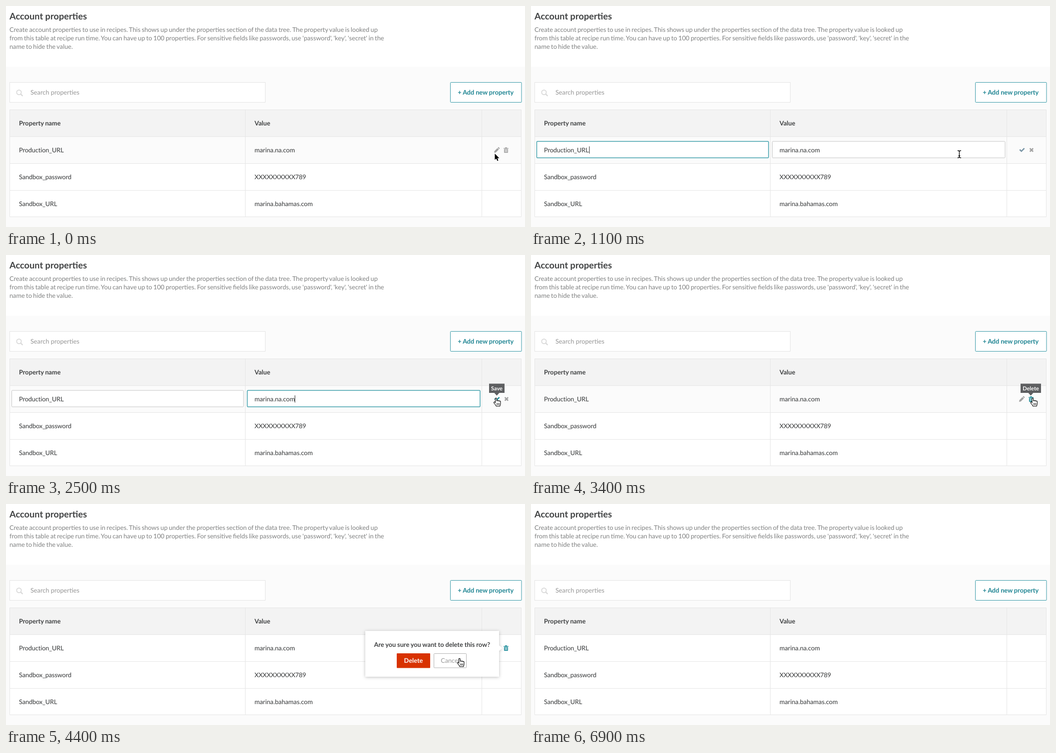
These frames come from a looping animation (1040x444 px, 7 s). An HTML page:

```html
<!DOCTYPE html>
<html lang="en">
<head>
<meta charset="utf-8">
<title>Account properties</title>
<style>
  html, body { margin: 0; width: 100%; height: 100%; overflow: hidden; background: #fff; }
  svg { display: block; }
  text { font: 12.74px Lato, sans-serif; fill: #343637; white-space: pre; text-rendering: geometricPrecision; }
  .bold { font-weight: 700; fill: #404243; word-spacing: -.02em; }
  .mid { text-anchor: middle; }
  .title { font-size: 18.2px; font-weight: 700; fill: #404243; }
  .note { fill: #7f8080; word-spacing: -.062em; }
  .tight { letter-spacing: -.11px; }
  .tip { font-size: 11px; font-weight: 700; fill: #fff; }
  .grid { fill: none; stroke: #e6e6e6; }
</style>
</head>
<body>
<svg width="1040" height="444" viewBox="0 0 1040 444">
  <defs>
    <filter id="shadow" x="-10%" y="-20%" width="120%" height="145%">
      <feDropShadow dx="0" dy="1" stdDeviation="3" flood-opacity=".25"/>
    </filter>
  </defs>
  <rect y="122" width="1040" height="322" fill="#fbfbfb"/>
  <text class="title" x="7" y="27">Account properties</text>
  <text class="note" x="7" y="51.7">Create account properties to use in recipes. This shows up under the properties section of the data tree. The property value is looked up</text>
  <text class="note" x="7" y="68.9">from this table at recipe run time. You can have up to 100 properties. For sensitive fields like passwords, use 'password', 'key', 'secret' in the</text>
  <text class="note" x="7" y="86">name to hide the value.</text>

  <rect x="7.5" y="153.5" width="512" height="40" fill="#fff" stroke="#e4e4e4"/>
  <g fill="none" stroke="#d9d9d9" stroke-width="1.8">
    <circle cx="26" cy="173.5" r="4.6"/>
    <path d="M29.4 176.9l4 4" stroke-width="2.2"/>
  </g>
  <text x="49" y="177.7" style="fill:#959595">Search properties</text>
  <rect x="890.5" y="153.5" width="142.5" height="40" rx="1" fill="#fff" stroke="#3a9ba8"/>
  <text class="bold mid" x="961.3" y="177.7" style="fill:#1f8593">+ Add new property</text>

  <rect x="7.5" y="208.5" width="1025" height="54" fill="#f3f3f3"/>
  <rect x="7.5" y="262.5" width="1025" height="161" fill="#fff"/>
  <rect id="hover" x="7.5" width="1025" height="54" fill="#fbfbfb"/>
  <path class="grid" d="M7.5 208.5H1032.5V423.5H7.5zM7.5 262.5H1032.5M7.5 316.5H1032.5M7.5 370.5H1032.5M479.5 208.5V423.5M953.5 208.5V423.5"/>
  <text class="bold" x="26" y="239.7">Property name</text>
  <text class="bold" x="498" y="239.7">Value</text>
  <text class="tight" x="26" y="293.7">Production_URL</text>
  <text x="498" y="293.7">marina.na.com</text>
  <text class="tight" x="26" y="347.6">Sandbox_password</text>
  <text class="tight" x="498" y="347.6">XXXXXXXXXX789</text>
  <text class="tight" x="26" y="401.6">Sandbox_URL</text>
  <text x="498" y="401.6">marina.bahamas.com</text>
  <g id="live"></g>
</svg>
<script>
const LOOP = 7000, STEP = 100, TEAL = '#1f8d9b', GREY = '#a3a3a3';
const EDIT = 700, FOCUS_VALUE = 1500, SAVE = 2700, ASK = 3700, CANCEL = 4700;

// Pointer path: time, x, y
const path = [
  [0, 979.5, 296.5], [200, 983, 289], [700, 983, 289], [1100, 858.3, 297.5],
  [1400, 700, 291], [1800, 700, 291], [2400, 982, 288], [2900, 982, 288],
  [3300, 1005.5, 288], [3800, 1005.5, 288], [4300, 909, 311], [4800, 909, 311],
  [5400, 936, 307], [5800, 944, 330], [6300, 930, 450], [LOOP, 930, 460]
];

const icons = {
  pencil: 'M978 295l.7-3.6 6-6 2.9 2.9-6 6zM985.4 284.7l.9-.9q.6-.5 1.2 0l1.6 1.6q.5.6 0 1.2l-.9.9z',
  trash: 'M997 285.6h2.8l.6-1.6h3.2l.6 1.6h2.8v1.2h-10zM998 287.4h8v6.4q0 1.2-1.2 1.2h-5.6q-1.2 0-1.2-1.2zM999.7 288.6v4.8h.9v-4.8zM1001.6 288.6v4.8h.9v-4.8zM1003.5 288.6v4.8h.9v-4.8z',
  check: 'M978.4 289.4l1.9-1.8 2.4 2.3 5-5 1.8 1.8-6.8 6.9z',
  cross: 'M998.7 287l1.9-1.9 2.3 2.3 2.3-2.3 1.9 1.9-2.3 2.3 2.3 2.3-1.9 1.9-2.3-2.3-2.3 2.3-1.9-1.9 2.3-2.3z'
};
const icon = (name, color, row = 0) =>
  `<path d="${icons[name]}" fill="${color}" fill-rule="evenodd" transform="translate(0 ${row * 54})"/>`;

const cursors = {
  arrow: '<path d="M0 0V12.6L2.9 9.9 5 14.7 7.1 13.8 5.1 9.2H9z" stroke="#fff" paint-order="stroke" stroke-width="2"/>',
  hand: '<path d="M-1.5 8.6V.8a1.4 1.4 0 0 1 2.8 0V5.4a1.3 1.3 0 0 1 2.6.3a1.3 1.3 0 0 1 2.6.5a1.2 1.2 0 0 1 2.4.7V11Q8.7 13 7.6 15.8H.4Q-.6 13.2-4.5 9a1.5 1.5 0 0 1 2.2-1.7z" fill="#fff" stroke="#000" stroke-width="1.1"/><path d="M1.8 9.5v4M4 9.5v4M6.2 9.5v4" stroke="#000" stroke-width=".9"/>',
  beam: [['#fff', 3], ['#000', 1.3]].map(([color, width]) =>
    `<path d="M-3.5-7Q-.5-7 0-5.5Q.5-7 3.5-7M0-5.5V6M-3.5 7.5Q-.5 7.5 0 6Q.5 7.5 3.5 7.5M-1.8 3.5H1.8" fill="none" stroke="${color}" stroke-width="${width}"/>`).join('')
};

function pointer(t) {
  const i = path.findIndex(p => p[0] > t);
  const [t0, x0, y0] = path[i - 1], [t1, x1, y1] = path[i];
  const u = (t - t0) / (t1 - t0), k = u * u * (3 - 2 * u);
  return [x0 + (x1 - x0) * k, y0 + (y1 - y0) * k];
}

function input(x, width, label, caretX, focusAge) {
  const focused = focusAge !== null;
  const caret = focused && focusAge % 1000 < 530
    ? `<path d="M${caretX} 282V296.5" stroke="#222"/>` : '';
  return `<rect x="${x}" y="272" width="${width}" height="33" rx="1.5" fill="#fff"
    stroke="${focused ? '#45a2ae' : '#c6c6c6'}" stroke-width="${focused ? 1.5 : 1}"/>${label}${caret}`;
}

function tooltip(x, label, width) {
  return `<path d="M${x - width / 2} 258.5h${width}v18.5h${-width}zM${x - 5} 277h10l-5 5.5z" fill="#5e5f61"/>
    <text class="tip mid" x="${x}" y="272">${label}</text>`;
}

const nameText = '<text class="tight" x="26" y="293.7">Production_URL</text>';
const valueText = '<text x="498" y="293.7">marina.na.com</text>';
const popup = `<path d="M720 255H988V284L994 289.5 988 295V347H720z" fill="#fff" filter="url(#shadow)"/>
  <text class="bold mid" x="853.8" y="286.5">Are you sure you want to delete this row?</text>
  <rect x="783" y="300" width="67" height="29.5" rx="1" fill="#d83200"/>
  <text class="bold mid" x="816.5" y="319.3" style="fill:#fff">Delete</text>
  <rect x="857.5" y="300.5" width="65" height="28.5" rx="1" fill="#fff" stroke="#b4b4b4"/>
  <text class="mid" x="890" y="319.3" style="fill:#999">Cancel</text>`;

function render(t) {
  const [x, y] = pointer(t);
  const editing = t >= EDIT && t < SAVE, asking = t >= ASK && t < CANCEL;
  const over = (cx, cy, w, h) => Math.abs(x - cx) < w && Math.abs(y - cy) < h;
  const left = !asking && over(984, 289, 6, 7), right = !asking && over(1002, 289, 6, 7);
  const row = editing || asking ? 0 : Math.floor((y - 262) / 54);
  const inTable = row >= 0 && row < 3;
  let shape = 'arrow', out = '';

  hover.setAttribute('y', 262.5 + row * 54);
  hover.style.display = inTable && !asking ? '' : 'none';

  if (editing) {
    const inValue = t >= FOCUS_VALUE;
    out += input(11.5, 464.5, nameText, 117, inValue ? null : t - EDIT)
      + input(483.5, 466.5, valueText, 579, inValue ? t - FOCUS_VALUE : null)
      + icon('check', left ? TEAL : '#7894a5') + icon('cross', right ? TEAL : GREY);
    if (over(717, 288.5, 234, 17)) shape = 'beam';
  } else if (inTable) {
    out += icon('pencil', left ? TEAL : GREY, row)
      + icon('trash', right || asking ? TEAL : GREY, row);
  }
  if (asking) out += popup;
  if (left) out += editing ? tooltip(983.5, 'Save', 31) : tooltip(983.5, 'Edit', 28);
  if (right) out += editing ? tooltip(1002.5, 'Cancel', 42) : tooltip(1001.5, 'Delete', 41);
  if (left || right || asking && (over(890, 315, 34, 15) || over(1002, 289, 6, 7))) shape = 'hand';
  live.innerHTML = out + `<g transform="translate(${x} ${y})">${cursors[shape]}</g>`;
}

const hover = document.getElementById('hover'), live = document.getElementById('live');
const start = performance.now();
let shown = -1;
function tick() {
  const t = Math.floor((performance.now() - start) % LOOP / STEP) * STEP;
  if (t !== shown) render(shown = t);
  requestAnimationFrame(tick);
}
tick();
</script>
</body>
</html>
```
